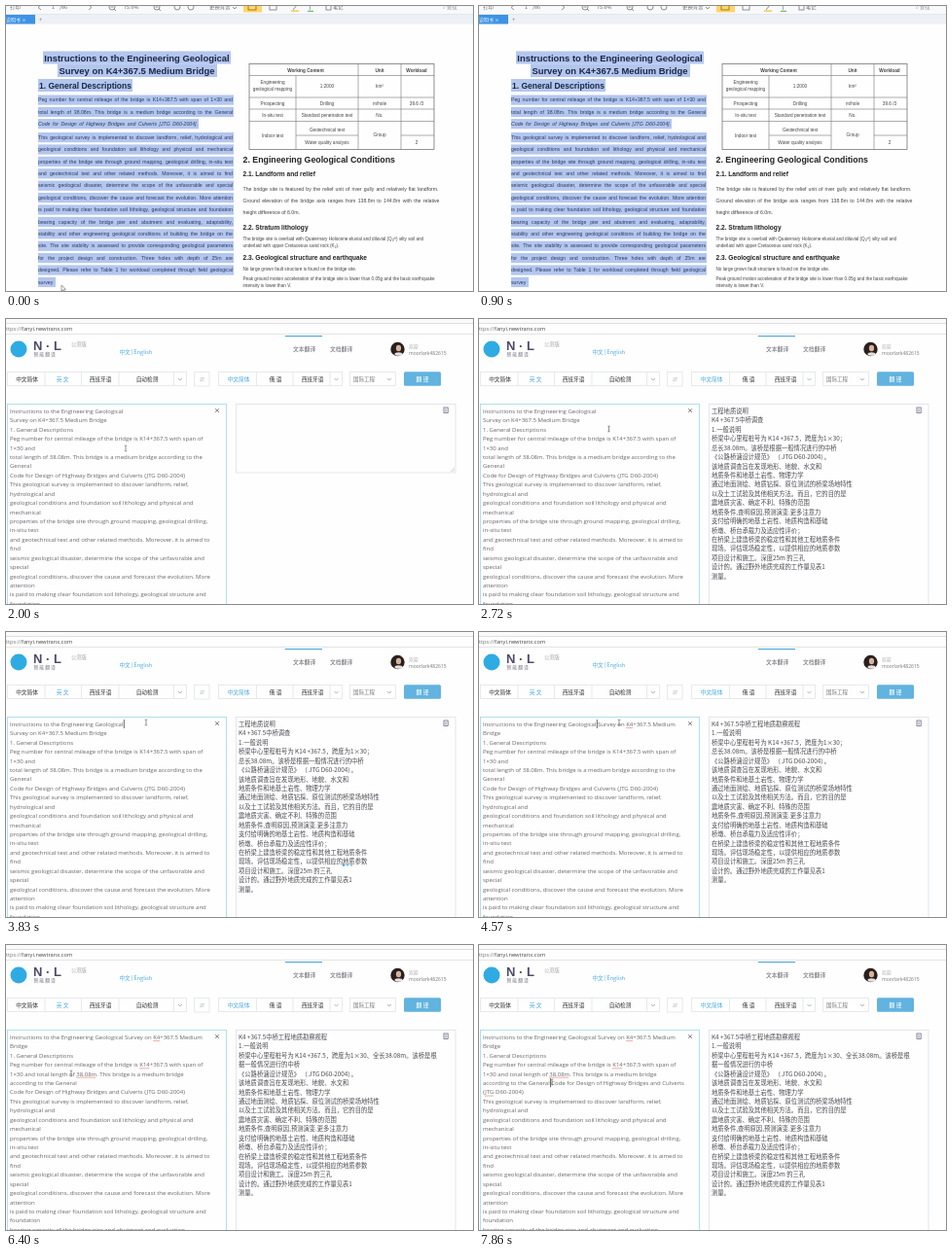
An HTML page with a canvas for the animation above (8000 ms loop, 480 px wide and 293 px high).

```html
<!DOCTYPE html>
<html lang="zh-CN">
<head>
<meta charset="utf-8">
<title>Document translation</title>
<style>
html, body { margin: 0; width: 100%; height: 100%; overflow: hidden; background: #fff; }
canvas { display: block; width: 100vw; height: 100vh; }
</style>
</head>
<body>
<canvas id="stage"></canvas>
<script>
const W = 480, H = 293, LOOP = 8000, TICK = 182;
const UI = '"Noto Sans CJK SC", "Noto Sans CJK", sans-serif';
const LATIN = '"Open Sans", "Noto Sans", sans-serif';
const DOC = '"Liberation Sans", sans-serif';
const BLUE = '#4aa9e0', INK = '#66646c', GREY = '#98989e', LINE = '#e2e4e8';
const PITCH = 9.43;

const canvas = document.getElementById('stage');
const ctx = canvas.getContext('2d');
const dpr = window.devicePixelRatio || 1;
canvas.width = W * dpr;
canvas.height = H * dpr;

// y is the optical middle of the line
function put(s, x, y, size, color, opt = {}) {
  ctx.font = `${opt.style || ''} ${size}px ${opt.font || UI}`;
  ctx.textAlign = opt.align || 'left';
  ctx.fillStyle = color;
  ctx.fillText(s, x, y + size * 0.36);
}
function rect(x, y, w, h, color) {
  ctx.fillStyle = color;
  ctx.fillRect(x, y, w, h);
}
function frame(x, y, w, h, color, width = 0.8) {
  ctx.strokeStyle = color;
  ctx.lineWidth = width;
  ctx.strokeRect(x, y, w, h);
}
function path(points, color, width = 0.8) {
  ctx.beginPath();
  points.forEach(([x, y], i) => i ? ctx.lineTo(x, y) : ctx.moveTo(x, y));
  ctx.strokeStyle = color;
  ctx.lineWidth = width;
  ctx.stroke();
}
function poly(points, color) {
  ctx.beginPath();
  points.forEach(([x, y]) => ctx.lineTo(x, y));
  ctx.fillStyle = color;
  ctx.fill();
}
function oval(x, y, rx, ry, color, turn = 0) {
  ctx.beginPath();
  ctx.ellipse(x, y, rx, ry, turn, 0, Math.PI * 2);
  ctx.fillStyle = color;
  ctx.fill();
}
function ring(x, y, r, color) {
  ctx.beginPath();
  ctx.arc(x, y, r, 0, Math.PI * 2);
  ctx.strokeStyle = color;
  ctx.lineWidth = 0.8;
  ctx.stroke();
}
const chevron = (x, y) => path([[x - 2, y - 1], [x, y + 1], [x + 2, y - 1]], '#999', 0.7);

// share of a move done at time t, advancing one screen refresh at a time
const progress = (t, from, steps) =>
  Math.min(1, Math.max(0, (Math.floor((t - from) / TICK) + 1) / steps));

/* ---------- document reader ---------- */

const body = [
  'Peg number for central mileage of the bridge is K14+367.5 with span of 1×30 and',
  'total length of 38.08m. This bridge is a medium bridge according to the General',
  'Code for Design of Highway Bridges and Culverts [JTG D60-2004].',
  'This geological survey is implemented to discover landform, relief, hydrological and',
  'geological conditions and foundation soil lithology and physical and mechanical',
  'properties of the bridge site through ground mapping, geological drilling, in-situ test',
  'and geotechnical test and other related methods. Moreover, it is aimed to find',
  'seismic geological disaster, determine the scope of the unfavorable and special',
  'geological conditions, discover the cause and forecast the evolution. More attention',
  'is paid to making clear foundation soil lithology, geological structure and foundation',
  'bearing capacity of the bridge pier and abutment and evaluating, adaptability,',
  'stability and other engineering geological conditions of building the bridge on the',
  'site. The site stability is assessed to provide corresponding geological parameters',
  'for the project design and construction. Three holes with depth of 25m are',
  'designed. Please refer to Table 1 for workload completed through field geological',
  'survey'
];

function justify(s, x, y, w, size, color, style) {
  const words = s.split(' ');
  ctx.font = `${style || ''} ${size}px ${DOC}`;
  const widths = words.map(v => ctx.measureText(v).width);
  const gap = (w - widths.reduce((a, b) => a + b, 0)) / (words.length - 1);
  words.forEach((v, i) => {
    put(v, x, y, size, color, { font: DOC, style });
    x += widths[i] + gap;
  });
}

function drawToolbar() {
  rect(0, 0, W, 8, '#f8f9fb');
  rect(0, 8, W, 10.5, '#edf0f5');
  rect(0, 9, 30, 9.5, '#3d93e4');
  put('说明书 ×', 0, 13.7, 5, '#eaf4ff');
  put('+', 34, 13.7, 6, '#888');
  path([[0, 8.5], [W, 8.5]], '#e2e5ea');
  put('打印', 4, 1.5, 5.4, '#666');
  path([[36, -1], [33, 1.5], [36, 4]], '#777');
  put('1', 47, 1.5, 5.4, '#666');
  put('/86', 55, 1.5, 5.4, '#666');
  path([[85, -1], [88, 1.5], [85, 4]], '#777');
  for (const x of [109, 155]) {
    ring(x, 1, 3, '#777');
    path([[x + 2, 3], [x + 4, 5]], '#777');
    path([[x - 1.5, 1], [x + 1.5, 1]], '#777');
  }
  put('75.0%', 121, 1.5, 5.4, '#666');
  ring(176, 1, 3, '#777');
  ring(190, 1, 3, '#777');
  put('更换背景', 209, 1.5, 5.4, '#666');
  path([[233, 1], [235, 3], [237, 1]], '#777');
  rect(244, 0, 19, 6.5, '#ffd56a');
  frame(249, -1, 8, 5, '#8b6a20');
  frame(271, -1, 7, 5, '#777');
  path([[295, 4], [299, -1]], '#777');
  rect(293, 4.5, 8, 1.2, '#f0c22c');
  put('T', 311, 1.5, 5.8, '#666');
  rect(310, 4.8, 6, 1, '#52ad50');
  frame(329, -1, 5, 5, '#777');
  put('笔记', 336, 1.5, 5.2, '#666');
  put('⌕ 查找', 449, 1.5, 5.2, '#888');
}

function drawTable() {
  const dark = '#77777c';
  const cell = (s, x, y, style) => put(s, x, y, 4.7, '#444', { font: DOC, align: 'center', style });
  frame(250, 59.5, 190, 88, dark);
  for (const y of [71.5, 94, 106, 118.5]) path([[250, y], [440, y]], dark, 0.6);
  path([[298, 133], [362, 133]], dark, 0.6);
  path([[406, 133], [440, 133]], dark, 0.6);
  path([[298, 71.5], [298, 147.5]], dark, 0.6);
  for (const x of [362, 406]) path([[x, 59.5], [x, 147.5]], dark, 0.6);
  cell('Working Content', 308, 66, 'bold');
  cell('Unit', 384, 66, 'bold');
  cell('Workload', 422, 66, 'bold');
  cell('Engineering', 274, 78.5);
  cell('geological mapping', 274, 85.5);
  cell('1:2000', 330, 82);
  cell('km²', 384, 82);
  ['Prospecting', 'Drilling', 'm/hole', '39.6 /3'].forEach((s, i) => cell(s, [274, 330, 384, 422][i], 100));
  ['In-situ test', 'Standard penetration test', 'No.'].forEach((s, i) => cell(s, [274, 330, 384][i], 112.5));
  cell('Indoor test', 274, 133.5);
  cell('Geotechnical test', 330, 127);
  cell('Water quality analysis', 330, 140);
  cell('Group', 384, 132);
  cell('2', 422, 140);
}

function drawArrow(x, y) {
  const shape = [[0, 0], [0, 6], [1.5, 4.8], [2.6, 7], [3.5, 6.5], [2.5, 4.4], [4.3, 4.2], [0, 0]]
    .map(([dx, dy]) => [x + dx, y + dy]);
  poly(shape, '#fff');
  path(shape, '#444', 0.5);
}

function drawReader(t) {
  rect(0, 0, W, H, '#fefefe');
  drawToolbar();

  const mark = '#b3c6ee', ink = '#2c3a63', head = '#1d2747';
  rect(38, 46.5, 193, 13, mark);
  rect(53, 59.5, 164, 13.5, mark);
  rect(33, 75, 97, 13, mark);
  const bold = { font: DOC, style: 'bold' };
  const mid = { ...bold, align: 'center' };
  put('Instructions to the Engineering Geological', 134.5, 53.6, 9.45, head, mid);
  put('Survey on K4+367.5 Medium Bridge', 134.5, 66.6, 9.45, head, mid);
  put('1. General Descriptions', 34, 81.8, 8.5, head, bold);
  body.forEach((s, i) => {
    const y = i < 3 ? 96.5 + i * 12.3 : 135 + (i - 3) * 12.4;
    const w = i === 2 ? 164 : i === 15 ? 17 : 200;
    rect(33, y - 5, w + 1, 10.2, mark);
    if (i === 15) put(s, 33, y, 5.2, ink, { font: DOC });
    else justify(s, 33, y, w, 5.2, ink, i === 2 ? 'italic' : '');
  });

  drawTable();
  put('2. Engineering Geological Conditions', 243.5, 157.5, 8.8, '#222', bold);
  put('2.1. Landform and relief', 243.5, 173, 6.6, '#222', bold);
  put('2.2. Stratum lithology', 243.5, 227.5, 6.6, '#222', bold);
  put('2.3. Geological structure and earthquake', 243.5, 258.5, 6.6, '#222', bold);
  justify('The bridge site is featured by the relief unit of river gully and relatively flat landform.', 243.5, 188, 201, 5.2, '#444');
  justify('Ground elevation of the bridge axis ranges from 138.8m to 144.8m with the relative', 243.5, 200, 202, 5.2, '#444');
  put('height difference of 6.0m.', 243.5, 212, 5.2, '#444', { font: DOC });
  [['The bridge site is overlaid with Quaternary Holocene eluvial and diluvial (Q₄ᵉˡ) silty soil and', 239.5],
   ['underlaid with upper Cretaceous sand rock (K₂).', 246.5],
   ['No large grown fault structure is found on the bridge site.', 270.5],
   ['Peak ground motion acceleration of the bridge site is lower than 0.05g and the basic earthquake', 280],
   ['intensity is lower than V.', 287]
  ].forEach(([s, y]) => put(s, 243.5, y, 4.65, '#444', { font: DOC }));

  drawArrow(57, 287 + 8 * progress(t, 180, 5));
}

/* ---------- translation page ---------- */

const OPEN = 1080, PASTE = 2000, REPLY = 2540;
const JOIN1 = 4020, REPLY2 = 4380, JOIN2 = 6030, REPLY3 = 6400, JOIN3 = 7860;

function sourceLines(t) {
  const title = t < JOIN1
    ? ['Instructions to the Engineering Geological', 'Survey on K4+367.5 Medium Bridge']
    : ['Instructions to the Engineering Geological Survey on K4+367.5 Medium', 'Bridge'];
  const code = 'Code for Design of Highway Bridges and Culverts';
  const start = t < JOIN2
    ? ['1×30 and', 'total length of 38.08m. This bridge is a medium bridge according to the', 'General']
    : ['1×30 and total length of 38.08m. This bridge is a medium bridge', 'according to the General'];
  const rule = t < JOIN3 ? [code + ' (JTG D60-2004)'] : ['(JTG D60-2004)'];
  if (t >= JOIN3) start[1] += ' ' + code;
  return [
    ...title, '1. General Descriptions',
    'Peg number for central mileage of the bridge is K14+367.5 with span of',
    ...start, ...rule,
    'This geological survey is implemented to discover landform, relief,', 'hydrological and',
    'geological conditions and foundation soil lithology and physical and', 'mechanical',
    'properties of the bridge site through ground mapping, geological drilling,', 'in-situ test',
    'and geotechnical test and other related methods. Moreover, it is aimed to', 'find',
    'seismic geological disaster, determine the scope of the unfavorable and', 'special',
    'geological conditions, discover the cause and forecast the evolution. More', 'attention',
    'is paid to making clear foundation soil lithology, geological structure and', 'foundation',
    'bearing capacity of the bridge pier and abutment and evaluation,'
  ];
}

function resultLines(t) {
  const title = t < REPLY2 ? ['工程地质说明', 'K4 +367.5中桥调查'] : ['K4 +367.5中桥工程地质勘察规程'];
  const peg = '桥梁中心里程桩号为 K14 +367.5，跨度为1×30';
  const start = t < REPLY3
    ? [peg + '；', '总长38.08m。该桥是根据一般情况进行的中桥']
    : [peg + '、全长38.08m。该桥是根', '据一般情况进行的中桥'];
  return [
    ...title, '1.一般说明', ...start,
    '《公路桥涵设计规范》 （ JTG D60-2004）。',
    '该地质调查旨在发现地形、地貌、水文和',
    '地质条件和地基土岩性、物理力学',
    '通过地面测绘、地质钻探、原位测试的桥梁场地特性',
    '以及土工试验及其他相关方法。而且，它的目的是',
    '震地质灾害、确定不利、特殊的范围',
    '地质条件,查明原因,预测演变.更多注意力',
    '支付给明确的地基土岩性、地质构造和基础',
    '桥墩、桥台承载力及适应性评价；',
    '在桥梁上建造桥梁的稳定性和其他工程地质条件',
    '现场。评估现场稳定性，以提供相应的地质参数',
    '项目设计和施工。深度25m 的三孔',
    '设计的。通过野外地质完成的工作量见表1',
    '测量。'
  ];
}

function drawHeader() {
  rect(0, 0, W, 4, '#fafafa');
  path([[0, 4.5], [W, 4.5]], '#d6d6d8');
  path([[0, 15.5], [W, 15.5]], '#dddddf');
  put('https://', -3.5, 9.5, 5.7, '#777', { font: LATIN });
  put('fanyi.newtranx.com', 16, 9.5, 5.7, '#444', { font: LATIN });
}

function drawNav(dx) {
  ctx.save();
  ctx.translate(dx, 0);
  oval(16, 31, 8.5, 8.5, '#2fabe3');
  put('N · L', 31, 27, 13, '#4c4a66', { font: DOC, style: 'bold' });
  put('智 能 翻 译', 31.5, 36.5, 4.8, '#77758a');
  put('公测版', 70, 26.5, 5.3, '#aaa');
  put('中文 | English', 119.5, 34, 5.5, BLUE);
  rect(290, 17, 38, 1.2, '#4fa9dc');
  put('文本翻译', 298, 31, 5.8, INK);
  put('文档翻译', 336, 31, 5.8, INK);
  oval(405.5, 31, 7.2, 7.2, '#2a2020');
  oval(406.5, 30, 2.6, 3.2, '#d9b29a');
  oval(406.5, 36, 4, 1.8, '#e8e0dc');
  put('欢迎', 417, 28, 4.8, '#aaa');
  put('moorlark482615', 417, 35, 5, '#777', { font: LATIN });
  ctx.restore();
}

function langBar(x, w, dividers, names, active, arrow) {
  frame(x, 62.5, w, 14, LINE);
  dividers.forEach(d => path([[d, 62.5], [d, 76.5]], LINE));
  names.forEach(([s, cx], i) => put(s, cx, 70, 5.7, i === active ? BLUE : '#333', { align: 'center', style: '500' }));
  chevron(arrow, 70);
}

function drawControls(busy) {
  langBar(4.5, 184, [43, 80.5, 119, 175.5],
    [['中文简体', 24.5], ['英 文', 61], ['西班牙语', 100], ['自动检测', 148]], 1, 182);
  frame(196.5, 62.5, 15.5, 14.5, LINE);
  path([[202.5, 69], [206.5, 69], [205.5, 68]], '#aaa', 0.6);
  path([[206.5, 71], [202.5, 71], [203.5, 72]], '#aaa', 0.6);
  langBar(221.5, 127, [260.5, 298, 336],
    [['中文简体', 242], ['俄 语', 280], ['西班牙语', 318]], 0, 342.5);
  frame(356.5, 62.5, 47, 14, LINE);
  put('国际工程', 360, 70, 5.5, '#777');
  chevron(397, 70);
  ctx.beginPath();
  ctx.roundRect(412, 62.3, 38, 14.4, 1.5);
  ctx.fillStyle = '#62b3df';
  ctx.fill();
  put('翻 译', 431, 70, 5.8, busy ? '#dff0fa' : '#fff', { align: 'center', style: 'bold' });
}

function drawBoxes(focus, leftH, rightH) {
  frame(4.5, 95.5, 225, leftH, focus ? '#9fd9ea' : '#dfe1e6');
  frame(239.5, 95.5, 225.5, rightH, '#dde0e8');
  path([[218.2, 100.2], [222, 104]], '#666', 0.8);
  path([[222, 100.2], [218.2, 104]], '#666', 0.8);
  frame(453, 99, 4.2, 5.4, '#6a6a86', 0.8);
  path([[454.2, 101], [456, 101]], '#6a6a86', 0.7);
  path([[454.2, 102.7], [456, 102.7]], '#6a6a86', 0.7);
  for (const [x, h] of [[228.5, leftH], [464, rightH]])
    for (const d of [2, 4]) path([[x - d, 94.5 + h], [x, 94.5 + h - d]], '#aaa', 0.5);
}

function roof(x, y, w, h) {
  poly([[x, y + h], [x + w * 0.14, y], [x + w * 0.86, y], [x + w, y + h]], '#e0a23a');
  rect(x + w * 0.05, y + h, w * 0.9, 1.8, '#3a2a26');
}

function drawBanner() {
  ctx.save();
  ctx.beginPath();
  ctx.rect(4, 206, 461, 47);
  ctx.clip();
  const sky = ctx.createLinearGradient(0, 206, 0, 253);
  sky.addColorStop(0, '#7dbfb0');
  sky.addColorStop(0.45, '#f2dcb0');
  sky.addColorStop(1, '#eeb579');
  rect(4, 206, 461, 47, sky);
  for (let i = 0; i < 16; i++)
    oval(84 + i * 17, 209 + (i * 13) % 34, 20, 3.2, i % 2 ? '#f6e3bd' : '#8cc6b6');
  poly([[60, 253], [90, 246], [150, 249], [230, 250], [300, 247], [345, 253]], '#c8512c');
  // gate tower
  rect(4, 227, 76, 26, '#c22015');
  rect(10, 217, 54, 10, '#8f1a14');
  roof(4, 209, 66, 7);
  roof(0, 222, 80, 5);
  for (let x = 9; x < 78; x += 10) rect(x, 229, 2, 9, '#e8b146');
  poly([[4, 253], [4, 240], [50, 243], [112, 253]], '#5d2218');
  path([[4, 239], [52, 242], [114, 253]], '#e0a23a', 1.6);
  // hall
  poly([[330, 206], [465, 206], [465, 253], [312, 253], [336, 236]], '#c92015');
  poly([[318, 206], [465, 206], [465, 215], [352, 213]], '#d99a38');
  poly([[326, 210], [465, 215], [465, 221], [344, 219]], '#2f6d66');
  poly([[354, 230], [465, 222], [465, 227], [346, 235]], '#e0a844');
  for (let x = 362; x < 462; x += 17) {
    rect(x, 234, 4, 19, '#7d1410');
    oval(x + 10, 241, 3.6, 4, '#ea4b28');
  }
  rect(310, 249, 155, 4, '#7c2418');
  // dove
  oval(120, 232, 7, 3, '#fff', 0.5);
  poly([[119, 232], [109, 213], [115, 216], [123, 229]], '#fff');
  poly([[121, 231], [124, 211], [128, 217], [125, 232]], '#f4efe8');
  poly([[115, 232], [109, 241], [114, 242], [119, 235]], '#fff');

  const title = [['沐笺科技助力', '#1c1512'], ['年会', '#b8201a'], ['沟通无限', '#1c1512']];
  ctx.font = `900 14.7px ${UI}`;
  ctx.lineJoin = 'round';
  let x = 147;
  for (const [s, color] of title) {
    ctx.textAlign = 'left';
    ctx.strokeStyle = '#fff7e6';
    ctx.lineWidth = 2.2;
    ctx.strokeText(s, x, 231.5);
    put(s, x, 226.2, 14.7, color, { style: '900' });
    x += ctx.measureText(s).width;
  }
  put('【年会特别版】', 236, 242, 8.6, '#2a1a12', { align: 'center', style: 'bold' });
  ctx.restore();
}

function drawFooter() {
  put('最多可以输入200个字。体验更好的翻译服务，请使用', 4, 170.5, 5.53, '#888');
  put('在线文档翻译', 134.5, 170.5, 5.53, BLUE);
  drawBanner();
  put('快捷链接:', 155, 269, 5.6, '#777');
  [['沐笺官网', 187], ['翻译邮件', 218], ['沐笺App', 248], ['语料数据下载', 277]]
    .forEach(([s, x]) => put(s, x, 269, 5.55, BLUE));
  for (const x of [213.5, 244, 273]) path([[x, 266], [x, 272]], '#ccc', 0.6);
  put('沐笺信息科技有限公司', 163, 289, 5.55, GREY);
  put('京ICP备00000000号', 226.5, 289, 5.55, GREY);
  put('隐私政策', 284, 289, 5.55, GREY);
}

const lineY = i => 94.7 + i * PITCH;
const widthOf = s => {
  ctx.font = `6px ${LATIN}`;
  return ctx.measureText(s).width;
};

function underline(lines, word) {
  const row = lines.findIndex(s => s.includes(word));
  const s = lines[row];
  const x = 4 + widthOf(s.slice(0, s.indexOf(word)));
  const w = widthOf(word), points = [];
  for (let d = 0; d <= w; d += 1) points.push([x + d, lineY(row) + 3.7 + (d % 2 ? 0.4 : -0.2)]);
  path(points, '#dd6a60', 0.6);
}

function drawSource(t) {
  const lines = sourceLines(t);
  lines.forEach((s, i) => put(s, 4, lineY(i), 6, '#66666b', { font: LATIN }));
  [['K4', JOIN1], ['K14', 4930], ['38.08m', JOIN2], ['JTG', JOIN3]]
    .forEach(([word, from]) => { if (t >= from) underline(lines, word); });

  const spots = [
    [6940, 5, 'according to the General'],
    [5110, 4, '1×30 and'],
    [3090, 0, 'Instructions to the Engineering Geological']
  ];
  const spot = spots.find(s => t >= s[0]);
  if (spot && Math.floor((t - spot[0]) / 370) % 2 === 0)
    rect(4.4 + widthOf(spot[2]), lineY(spot[1]) - 4.7, 0.8, 9, '#444');
}

function drawSpinner(x, y, t) {
  const step = Math.floor(t / TICK);
  for (let i = 0; i < 3; i++)
    oval(x - 4 + i * 4, y, 1.3, 1.3, (step + i) % 3 ? '#8fc6ec' : '#3f97dc');
}

// each move: start time, refreshes it takes, end point
const moves = [[1270, 4, 123, 133], [2360, 4, 144, 93], [4930, 1, 67, 132], [6940, 1, 75, 141]];

function mouseAt(t) {
  let x = 95, y = 300;
  for (const [from, steps, toX, toY] of moves) {
    if (t < from) break;
    const k = progress(t, from, steps);
    x += (toX - x) * k;
    y += (toY - y) * k;
  }
  return [x, y];
}
function drawMouse(t) {
  const [x, y] = mouseAt(t);
  if (t < PASTE && y > 165) return drawArrow(x, y);
  path([[x, y - 2.8], [x, y + 2.8]], '#666', 0.7);
  for (const end of [y - 2.8, y + 2.8]) path([[x - 1.3, end], [x + 1.3, end]], '#666', 0.6);
}

function drawSite(t) {
  const pasted = t >= PASTE, replied = t >= REPLY;
  rect(0, 0, W, H, '#fefefe');
  drawHeader();
  drawNav(pasted ? -3 : 0);
  ctx.save();
  if (pasted) ctx.translate(-3, -8);
  drawControls(pasted);
  drawBoxes(t >= 1820, pasted ? 260 : 70, replied ? 260 : 70.5);
  ctx.restore();

  if (pasted) drawSource(t);
  else drawFooter();
  if (replied) resultLines(t).forEach((s, i) => put(s, 239, lineY(i), 6.3, '#48484e'));

  if (t >= 2180 && t < REPLY) drawSpinner(350, 122, t);
  if ([3830, 5850, 7680].some(a => t >= a && t < a + 180)) drawSpinner(351, 239.5, t);
  drawMouse(t);
}

function draw(now) {
  const t = now % LOOP;
  ctx.setTransform(dpr, 0, 0, dpr, 0, 0);
  if (t < OPEN) drawReader(t);
  else drawSite(t);
  requestAnimationFrame(draw);
}
requestAnimationFrame(draw);
</script>
</body>
</html>
```
